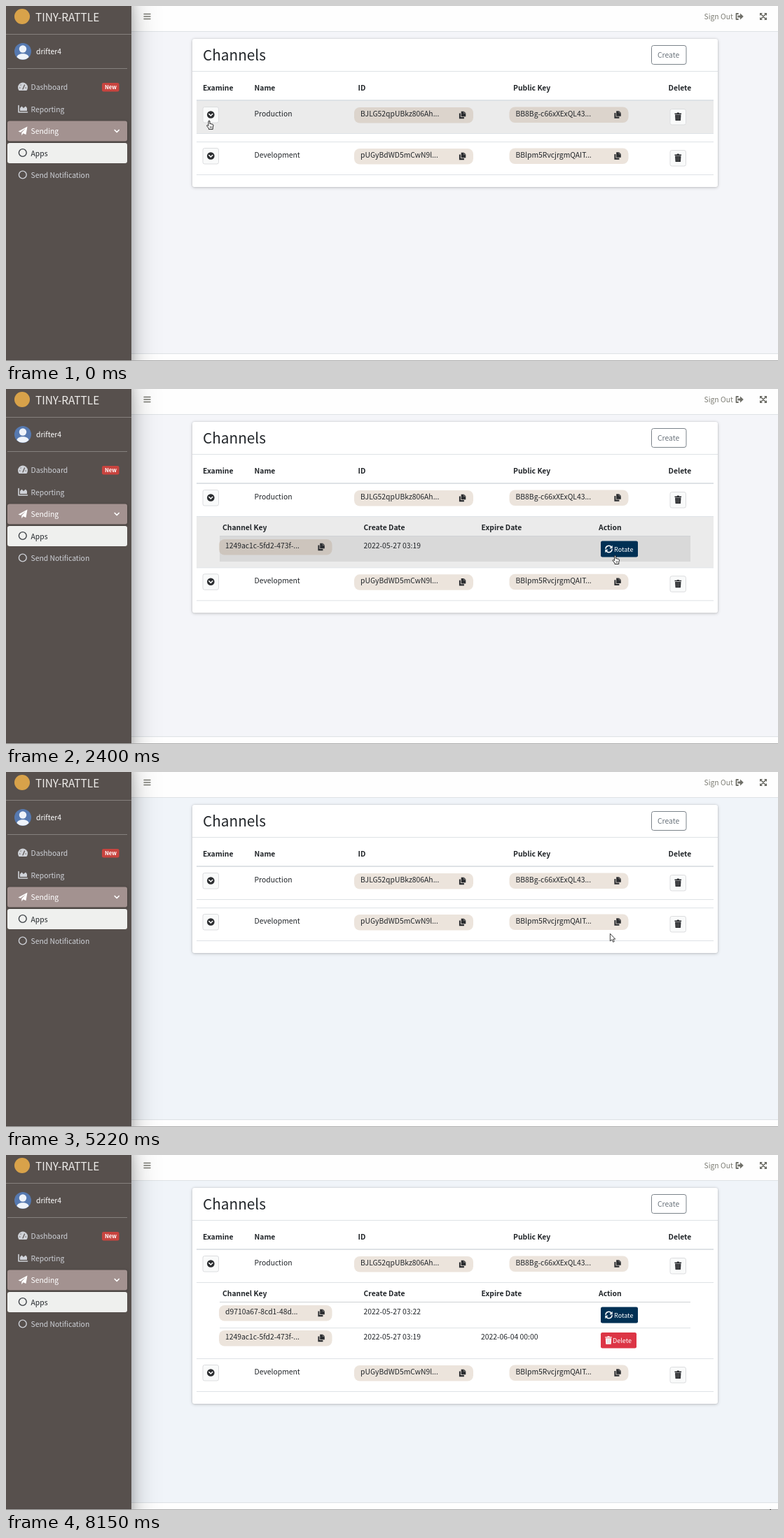
Write an HTML page that moves like this. It is 1102 px wide and 508 px high and loops after 8.28 s.

```html
<!DOCTYPE html>
<html lang="en">
<head>
<meta charset="utf-8">
<title>Channels</title>
<style>
  html, body { margin: 0; width: 100%; height: 100%; overflow: hidden; background: #fefefe; }
  svg { display: block; width: 1102px; height: 508px; }
  text { font: 10.36px "Noto Sans CJK JP", "Noto Sans CJK SC", "Open Sans", sans-serif; fill: #212529; white-space: pre; }
  .bold { font-weight: 700; }
  .title { font-size: 20.75px; }
  .brand { font-size: 15.4px; fill: #f1efed; }
  .white { fill: #fff; }
  .side { fill: #cfd2d8; }
  .muted { fill: #7d7d74; }
  .grey { fill: #6c757d; }
  .small { font-size: 9.05px; fill: #fff; }
  .badge { font-size: 7.8px; font-weight: 700; fill: #fff; }
  .line { stroke: #dee2e6; }
  .stroke { fill: none; stroke-linecap: round; stroke-linejoin: round; }
  #sidebar { filter: drop-shadow(0 10px 20px rgba(0,0,0,.25)) drop-shadow(0 7px 7px rgba(0,0,0,.22)); }
  #card { filter: drop-shadow(0 0 1px rgba(0,0,0,.13)) drop-shadow(0 1px 2px rgba(0,0,0,.2)); }
</style>
</head>
<body>
<svg id="stage" viewBox="0 0 1102 508"></svg>
<script>
const LOOP = 8280;
const DARK = '#2b2d30';

// Drawing helpers; text is placed by the middle of its capitals.
const text = (x, y, content, cls = '', id = '') =>
  `<text x="${x}" y="${y + 3.9}" class="${cls}" id="${id}">${content}</text>`;
const rect = (x, y, w, h, fill, extra = '') =>
  `<rect x="${x}" y="${y}" width="${w}" height="${h}" fill="${fill}" ${extra}/>`;
const line = (x1, x2, y, extra = 'class="line"') =>
  `<line x1="${x1}" x2="${x2}" y1="${y}" y2="${y}" ${extra}/>`;
const path = (d, extra) => `<path d="${d}" ${extra}/>`;
const stroke = (d, color, width = 1.4) =>
  path(d, `class="stroke" stroke="${color}" stroke-width="${width}"`);
const group = (id, content, extra = '') => `<g id="${id}" ${extra}>${content}</g>`;
const at = (x, y, content) => `<g transform="translate(${x} ${y})">${content}</g>`;

// Icons are drawn around their centre.
const copyIcon = (x, y) => at(x, y,
  path('M-4.6 -2.6H-2.6V3H2.4V5.2H-4.6Z', `fill="${DARK}"`) +
  path('M-1.8 -5.2H2.2L4.8 -2.8V2.3H-1.8Z', `fill="${DARK}"`) +
  stroke('M2 -5V-2.5H4.6', '#b9b3ac', .5));
const trashIcon = (x, y, color) => at(x, y,
  path('M-4.8 -4.8H-1.8L-1.2 -5.7H1.2L1.8 -4.8H4.8V-3.4H-4.8Z M-4.2 -2.7H4.2L3.7 5.7H-3.7Z', `fill="${color}"`) +
  stroke('M-1.7 -1.2V4.2M0 -1.2V4.2M1.7 -1.2V4.2', 'rgba(150,150,150,.6)', .6));
const syncIcon = (x, y) => at(x, y,
  stroke('M-4.5 -.8A4.5 4.5 0 0 1 3.6 -2.8M4.5 .8A4.5 4.5 0 0 1 -3.6 2.8', '#fff', 1.6) +
  path('M5.2 -5.2V-.8H.8ZM-5.2 5.2V.8H-.8Z', 'fill="#fff"'));
const chevronIcon = (x, y) => at(x, y,
  `<circle r="5.3" fill="${DARK}"/>` + stroke('M-2.5 -1L0 1.6L2.5 -1', '#fff', 1.5));

const lightButton = (x, y, id = '') =>
  rect(x, y, 22.5, 22.5, '#f9fafa', `rx="2.5" stroke="#dcdddf" id="${id}"`);
const pill = (x, y, w, content) =>
  rect(x, y, w, 22.5, 'rgba(150,105,60,.18)', 'rx="8"') +
  text(x + 9, y + 9.3, content) + copyIcon(x + w - 15.5, y + 11);

// Coordinates inside a channel row are those of the first row.
const channelRow = (id, name, channelId, publicKey) => group(id,
  rect(272, 135, 738, 47.5, 'rgba(0,0,0,.078)', `id="${id}Hover"`) +
  line(272, 1010, 135.5) + line(272, 1010, 182.5) +
  lightButton(281, 144.5, id + 'Button') + chevronIcon(292.3, 155.5) +
  text(354.5, 154, name) +
  pill(497, 145, 170, channelId) + pill(718.5, 144.5, 170, publicKey) +
  lightButton(948, 147.5) + trashIcon(959.3, 158.3, DARK));

const keyRow = (y, key, created, expires = '') =>
  pill(304, y + 4, 161.5, key) + text(510.5, y + 13, created) + text(678, y + 13, expires);

const detail = `<clipPath id="clip">${rect(266, 183, 750, 0, '#fff', 'id="clipRect"')}</clipPath>` +
  rect(272, 183, 738, 72.5, 'rgba(0,0,0,.078)', 'id="detailHover"') +
  group('detail',
    rect(305, 211, 672, 36, 'rgba(0,0,0,.078)', 'id="keyHover"') +
    text(309, 198, 'Channel Key', 'bold') + text(510.5, 198, 'Create Date', 'bold') +
    text(678.5, 198, 'Expire Date', 'bold') + text(846, 198, 'Action', 'bold') +
    line(305, 977, 210.5, 'stroke="#cfd2d5"') +
    group('oldKeys', keyRow(211, '1249ac1c-5fd2-473f-...', '2022-05-27 03:19')) +
    group('newKeys',
      keyRow(211, 'd9710a67-8cd1-48d...', '2022-05-27 03:22') + line(305, 977, 247.5) +
      keyRow(247, '1249ac1c-5fd2-473f-...', '2022-05-27 03:19', '2022-06-04 00:00') +
      rect(849, 254, 51, 22.5, '#dc3545', 'rx="2.3"') +
      trashIcon(860, 265, '#fff') + text(866, 265, 'Delete', 'small')) +
    rect(849, 217.5, 53, 23, '#003054', 'rx="2.3" id="rotate"') +
    syncIcon(860.5, 229) + text(868, 229, 'Rotate', 'small'),
    'clip-path="url(#clip)"');

const card =
  rect(266, 47, 750, 212, '#fff', 'rx="3" id="card"') +
  line(266, 1016, 93.5) + text(281, 74, 'Channels', 'title') +
  rect(921.5, 56.5, 49.5, 27, '#fff', 'rx="3" stroke="#7b838a"') + text(930, 70, 'Create', 'grey') +
  [[281, 'Examine'], [354.5, 'Name'], [502.5, 'ID'], [724, 'Public Key'], [945.5, 'Delete']]
    .map(([x, label]) => text(x, 117, label, 'bold')).join('') +
  line(272, 1010, 134.5) +
  group('rows',
    channelRow('production', 'Production', 'BJLG52qpUBkz806Ah...', 'BB8Bg-c66xXExQL43...') +
    detail +
    channelRow('development', 'Development', 'pUGyBdWD5mCwN9l...', 'BBlpm5RvcjrgmQAIT...'));

const navbar = rect(179, 0, 923, 36, '#fefefe') + line(179, 1102, 36.5) +
  text(996.5, 15.5, 'Sign Out', 'muted', 'signOut') +
  group('navIcons',
    stroke('M197 11.5H206M197 15H206M197 18.5H206', '#77776f') +
    stroke('M1045 11H1042.5V19H1045', '#6f6f68', 1.8) +
    path('M1044.5 13.4H1048V10.6L1052.8 15L1048 19.4V16.6H1044.5Z', 'fill="#6f6f68"') +
    stroke('M1077.5 11.5L1084.5 18.5M1084.5 11.5L1077.5 18.5', '#66665f', 1.5) +
    path('M1076 10H1080L1076 14ZM1086 10V14L1082 10ZM1076 20V16L1080 20ZM1086 20H1082L1086 16Z', 'fill="#66665f"'));

const sidebar =
  rect(0, -20, 179, 560, '#57504d', 'id="sidebar"') +
  line(0, 179, 40.5, 'stroke="#85807d"') + line(2, 173, 89.5, 'stroke="#85807d"') +
  group('sideMenu',
    '<circle cx="23" cy="15" r="11" fill="#d8a24a"/>' +
    '<circle cx="24" cy="65" r="12" fill="#5679b0"/>' +
    '<circle cx="24" cy="61.5" r="5.2" fill="#eef3fa"/>' +
    path('M15.5 73.2C16 66.5 32 66.5 32.5 73.2A12 12 0 0 1 15.5 73.2Z', 'fill="#eef3fa"') +
    path('M18.6 121A7 7 0 1 1 29.4 121Z', 'fill="#cfd2d8"') +
    stroke('M24 119L26.5 113M19.5 117H20M28 117H28.5M21 113H21.2', '#57504d', 1.2) +
    stroke('M18 142.5V152H30.5', '#cfd2d8', 1.6) +
    path('M20 150V146L22.5 143.5L25 146L28 143.5L30 146V150Z', 'fill="#cfd2d8"') +
    rect(2, 164.5, 171, 29, '#a39290', 'rx="3" style="filter:drop-shadow(0 1px 2px rgba(0,0,0,.25))"') +
    path('M17.5 179.5L30.5 172.5L28.5 184L24.5 182.3L22.3 185.3V181.2L28 175L20.8 180.8Z', 'fill="#fff"') +
    stroke('M155.2 177.5L158.2 180.5L161.2 177.5', '#fff', 1.7) +
    rect(2, 196, 171, 29, '#eff0ee', 'rx="3"') +
    '<circle cx="23.8" cy="210" r="5.4" fill="none" stroke="#3d4146" stroke-width="1.4"/>' +
    '<circle cx="23.8" cy="241.5" r="5.4" fill="none" stroke="#cfd2d8" stroke-width="1.4"/>' +
    text(35.5, 211, 'Apps') + text(35.5, 242, 'Send Notification', 'side')) +
  text(42, 18.5, 'TINY-RATTLE', 'brand', 'brand') + text(43, 65, 'drifter4', 'white') +
  text(35.5, 116, 'Dashboard', 'side') + text(35.5, 148, 'Reporting', 'side') +
  text(35.5, 179.5, 'Sending', 'white') +
  rect(137, 110, 24.5, 12.5, '#c8443f', 'rx="2.3"') + text(141, 115.3, 'New', 'badge');

const pointers =
  group('arrow', path('M0 0V10.6L2.5 8.4L4.2 12L5.9 11.2L4.3 7.8H7.4Z', 'fill="#fff" stroke="#111" stroke-width=".8"')) +
  group('hand', path('M-1 6.6V.8Q0 -.6 1 .8V4.4L5 5.3Q6 5.7 5.9 7L5.2 10V12.4H-.6V11L-3.4 7.6Q-3.3 6 -2 6.6L-1 7.6Z',
    'fill="#fff" stroke="#111" stroke-width=".9"') + stroke('M1.6 8.3V10.6M3.2 8.3V10.6', '#111', .6));

document.getElementById('stage').innerHTML =
  rect(0, 0, 1102, 508, '#fefefe') +
  group('shell', rect(179, 36, 923, 461, '#f4f5f9', 'id="backdrop"') + line(179, 1102, 497.5)) +
  group('ghost', rect(266, 47, 750, 273, '#fcfcfc') + rect(272, 135, 738, 125, '#fefefe')) +
  navbar + group('content', card) + sidebar +
  line(0, 1102, 507.5, 'stroke="#a9a9a9"') + group('pointer', pointers);

const el = id => document.getElementById(id);
const set = (id, name, value) => el(id).setAttribute(name, value);
const show = (id, visible) => { el(id).style.display = visible ? '' : 'none'; };
const clamp = v => Math.min(1, Math.max(0, v));
const swing = p => .5 - Math.cos(Math.PI * clamp(p)) / 2;
const between = (t, from, to) => t >= from && t < to;

// Pointer stops: time, x, y.
const stops = [
  [0, 290, 164], [70, 290, 164], [480, 291, 153], [1060, 291, 153], [2010, 852, 187],
  [2330, 870, 240], [2550, 868, 232], [5170, 868, 232], [5980, 290, 164],
  [7150, 290, 164], [7420, 1082, 122], [7670, 1097, 459], [7810, 1098, 496],
  [8140, 1091, 507], [LOOP, 1091, 507]
];
function pointerAt(t) {
  const i = stops.findIndex(stop => stop[0] > t);
  const [t0, x0, y0] = stops[i - 1], [t1, x1, y1] = stops[i];
  const p = swing((t - t0) / (t1 - t0));
  return [x0 + (x1 - x0) * p, y0 + (y1 - y0) * p];
}

function render(t) {
  const reloaded = t >= 4410;
  const bare = between(t, 4410, 4470);
  const [x, y] = pointerAt(t);

  // Page reload
  show('shell', !bare);
  show('ghost', bare);
  show('sideMenu', !bare);
  show('navIcons', !bare);
  show('content', !between(t, 4410, 4610));
  show('rows', !between(t, 4410, 4740));
  set('sidebar', 'height', bare ? 215.5 : 560);
  set('brand', 'x', bare ? 2 : 42);
  set('signOut', 'x', bare ? 1012.5 : 996.5);
  set('backdrop', 'fill', reloaded ? '#f0f4f9' : '#f4f5f9');

  // Sliding key list
  const open = reloaded ? 97 * swing((t - 5977) / 500) : 61.3 * swing((t - 560) / 500);
  set('development', 'transform', `translate(0 ${59 + open})`);
  set('card', 'height', 212 + open);
  set('clipRect', 'height', open > 0 ? open + 3 : 0);
  show('detail', open > 0);
  show('oldKeys', !reloaded);
  show('newKeys', reloaded);

  // Hover
  const tracked = t < 4410 || between(t, 5260, 7420);
  const onDetail = !reloaded && y > 187.5;
  show('productionHover', tracked && between(y, 135, 187.5) && x < 1010);
  show('developmentHover', tracked && reloaded && y > 194);
  show('detailHover', onDetail);
  show('keyHover', onDetail && y > 211);
  set('productionButton', 'fill', between(t, 5940, 7190) ? '#ededee' : '#f9fafa');
  const press = reloaded ? 0 : clamp((t - 2860) / 290);
  set('rotate', 'fill', `rgb(${27 * press},${48 + 10 * press},${84 + 19 * press})`);

  // Pointer
  const onExamine = between(x, 280, 304) && between(y, 144, 168);
  const onRotate = t < 3480 && between(x, 849, 902) && between(y, 217, 241);
  show('pointer', !between(t, 7460, 7670) && !between(t, 7810, 8140));
  set('pointer', 'transform', `translate(${x} ${y})`);
  show('hand', onExamine || onRotate);
  show('arrow', !onExamine && !onRotate);
}

const start = performance.now();
function tick() {
  render((performance.now() - start) % LOOP);
  requestAnimationFrame(tick);
}
tick();
</script>
</body>
</html>
```
